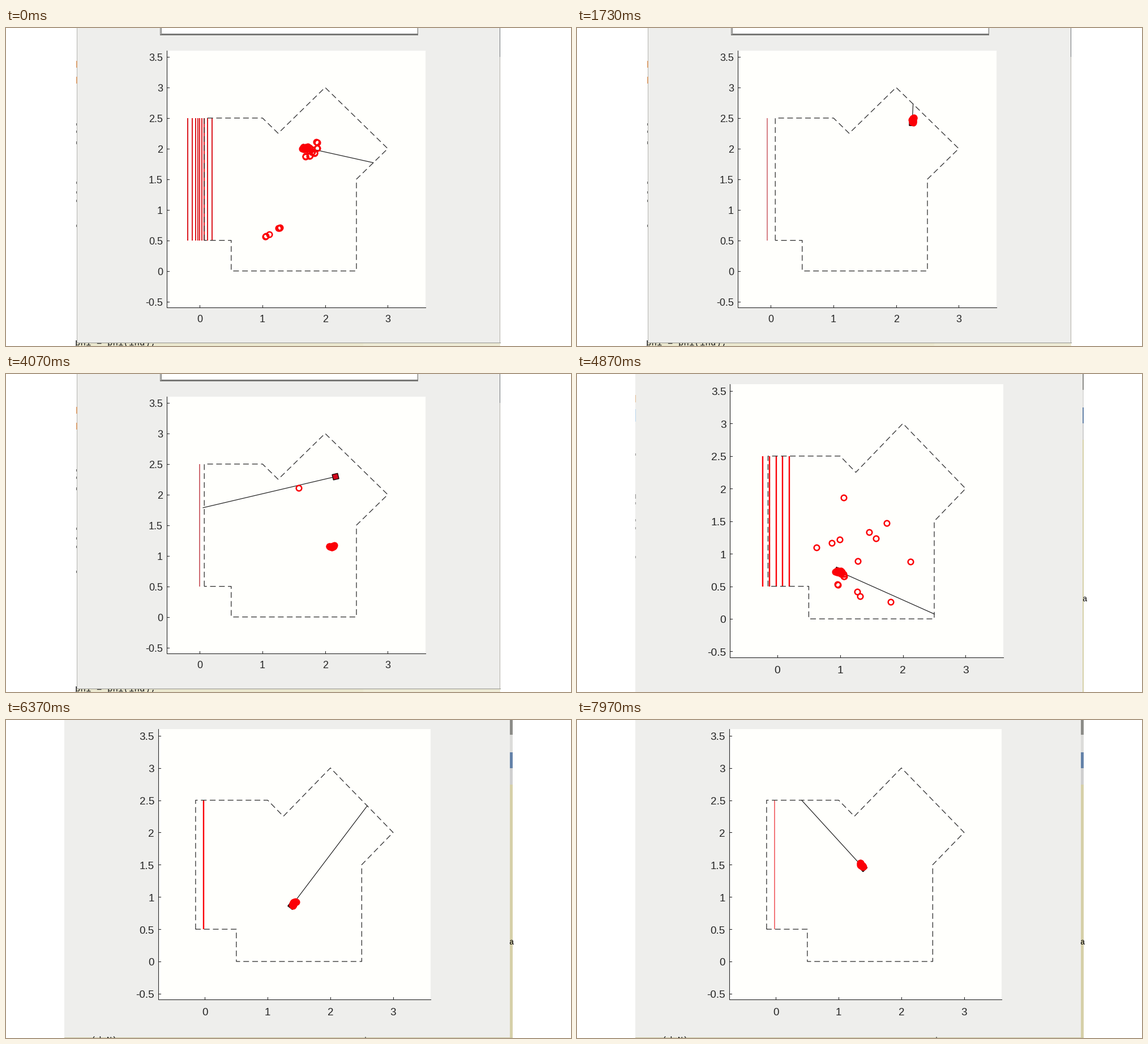
These frames come from a looping animation (998x561 px, 8000 ms). A matplotlib script:

```python
import numpy as np
import matplotlib.pyplot as plt
from matplotlib.animation import FuncAnimation
from matplotlib.patches import Polygon, Rectangle

W, H, DPI = 998, 561, 64
PT = 72 / DPI                      # points per pixel
STEP, FRAMES = 50, 160
FLIP, NEW_RUN, REFRAME = 3.6, 4.8, 5.6   # seconds: lost track, new run, new crop
INK, RED, PANEL, PAPER = "#262626", "#fb0007", "#eeeeec", "#fffffc"
SANS, MONO = "Liberation Sans", "Liberation Mono"

plt.rcParams["lines.scale_dashes"] = False
rng = np.random.default_rng(8)
fig = plt.figure(figsize=(W / DPI, H / DPI), dpi=DPI, facecolor="white")
ax = fig.add_axes([0, 0, 1, 1])
ax.set_xlim(0, W)
ax.set_ylim(H, 0)
ax.axis("off")


def room(wall):
    return np.array([(wall, .5), (wall, 2.5), (1, 2.5), (1.25, 2.25), (2, 3), (3, 2),
                     (2.5, 1.5), (2.5, 0), (.5, 0), (.5, .5), (wall, .5)])


class View:
    """One framing of the plot window: scale, origin and its static artists."""

    def __init__(self, origin, scale, wall, box, size):
        self.origin, self.scale = np.array(origin), np.array(scale) * (1, -1)
        self.wall, self.box, self.size = wall, box, size
        self.art = []

    def px(self, pts):
        return self.origin + self.scale * np.asarray(pts)

    def rect(self, x0, y0, x1, y1, color, z=1):
        self.art.append(ax.add_patch(Rectangle((x0, y0), x1 - x0, y1 - y0,
                                               fc=color, lw=0, zorder=z)))

    def line(self, xs, ys, color=INK, w=1.1, z=3, **kw):
        self.art += ax.plot(xs, ys, color=color, lw=w * PT, zorder=z, **kw)

    def text(self, x, y, s, size, font=SANS, color=INK, z=3, clip=None, **kw):
        item = ax.text(x, y, s, fontsize=size * PT, family=font, color=color,
                       va="baseline", zorder=z, **kw)
        if clip:
            x0, y0, x1, y1 = clip
            item.set_clip_path(Rectangle((x0, y0), x1 - x0, y1 - y0,
                                         transform=ax.transData))
        self.art.append(item)

    def specks(self, x, color):
        for y in rng.integers(130, 350, 8):
            self.rect(x, y, x + 1, y + 4, color, 3)

    def axes(self):
        l, t, r, b = self.box
        self.rect(l, t, r, b, PAPER, 2)
        self.line([l, l, r], [t, b, b], solid_joinstyle="miter")
        for v in np.arange(-.5, 3.6, .5):
            y = self.px((0, v))[1]
            self.line([l, l + 4], [y, y])
            self.text(l - 7, y + 7.4, f"{v:g}", self.size, ha="right")
        for v in range(4):
            x = self.px((v, 0))[0]
            self.line([x, x], [b, b - 4])
            self.text(x, b + 1.48 * self.size, str(v), self.size, ha="center")
        self.line(*self.px(room(self.wall)).T, color="#303030", w=1.3, z=6,
                  dashes=(10 * PT, 5.8 * PT), dash_capstyle="butt")

    def show(self, on):
        for a in self.art:
            a.set_visible(on)


wide = View((342.5, 428.6), (110.6, 107.9), .07, (284, 40, 741, 492.5), 18)
wide.rect(125, 0, 873, 555, PANEL)
wide.rect(125, 555, 873, H, "#ebe8cf", 0)
wide.rect(631, 556, 873, H, "#eeebd6", .2)
wide.line([125.5, 125.5], [0, 555], "#b4b4b0", 1)
wide.line([872.5, 872.5], [0, 555], "#b2b0a8", 1)
wide.line([872.5, 872.5], [0, 50], "#707478", 1)
wide.line([125, 873], [555, 555], "#a0a09a", 1.2)
for inset, color in enumerate(("#7c7c7a", "#dcdcda", "white")):
    wide.rect(272 + inset, 0, 728.5 - inset, 12.5 - 1.5 * inset, color, 1 + inset / 10)
wide.line([274.5, 274.5, 726], [0, 9.5, 9.5], "#6c6c6a", 1)
for y in (58, 86):
    wide.rect(124, y, 126, y + 12, "#d9a070", 4)
wide.specks(124, "#606060")
wide.text(122, 560, "phi = phi(ind);", 15.7, MONO, "#202020", .5, (124, 555, 264, H))

near = View((354, 432), (110.8, 114.9), -.15, (270.5, 18, 753.5, 500), 19.2)
near.rect(103, 37, 104.5, 50, "#e0b890", 3)
near.rect(103, 62, 104.5, 84, "#b8d4ec", 3)
near.specks(103, "#8a8a88")

late = View((351.5, 426), (110.75, 113.8), -.15, (269, 16, 750.5, 492.7), 18.9)
late.rect(103, 559.8, 895, H, "#c9c5a0", 1.5)
late.text(150, 570, "(d N)", 15.5, MONO, "#202020", clip=(148, 557, 198, H))
late.rect(634, 559, 636, H, "#777770", 2)

# slice of the window behind, at the right edge
for view, x, shift in ((near, 893.5, 2), (late, 890, 0)):
    view.rect(103, 0, 895, H, PANEL)
    for y, color in ((0, "#8c8c88"), (26, "#dcdcda"), (57, "#6482a8"),
                     (85, "#cfcfcf"), (114, "#d6d0a8")):
        view.rect(x, y + shift if y else 0, 895, H, color, 1.1 + y / 1000)
    view.text(x - 1.5, 396 + 2.5 * shift, "a", 14, MONO, "black", clip=(x - 1, 380, 895, 410))

views = (wide, near, late)
for v in views:
    v.axes()

# time, x, y, heading, drive from that key on (+1 forward, -1 reverse)
RUNS = (
    ((0, 1.67, 2.02, -14, 1), (1.73, 2.257, 2.424, 88, 1), (2.15, 2.26, 2.6, 109, -1),
     (3.17, 2.582, 2.294, 160.7, 1), (4.07, 2.166, 2.294, 193.5, 1),
     (4.85, 1.88, 2.12, 226, 1)),
    ((4.8, .945, .745, -27, 1), (5.47, 1.146, .722, 8.4, 1), (6.37, 1.385, .868, 52.1, 1),
     (7.97, 1.39, 1.455, 133.2, 1)),
)


def pose(t):
    """Position and heading on a Hermite path tangent to the headings."""
    keys = RUNS[t >= NEW_RUN]
    k = max(i for i in range(len(keys) - 1) if i == 0 or keys[i][0] <= t)
    (t0, x0, y0, h0, drive), (t1, x1, y1, h1, _) = keys[k:k + 2]
    u = min(max((t - t0) / (t1 - t0), 0), 1)
    a0, a1 = np.radians((h0, h1))
    p0, p1 = np.array((x0, y0)), np.array((x1, y1))
    d = drive * np.hypot(*(p1 - p0))
    pos = (p0 + (p1 - p0) * u * u * (3 - 2 * u)
           + d * u * (1 - u) ** 2 * np.array((np.cos(a0), np.sin(a0)))
           + d * u * u * (u - 1) * np.array((np.cos(a1), np.sin(a1))))
    return pos, a0 + (a1 - a0) * u


def beam(pos, a, wall):
    """Where a ray from pos first meets the room outline."""
    p = room(wall)
    q, e = p[:-1] - pos, np.diff(p, axis=0)
    c, s = np.cos(a), np.sin(a)
    det = c * e[:, 1] - s * e[:, 0]
    det[abs(det) < 1e-9] = 1e-9
    r = (q[:, 0] * e[:, 1] - q[:, 1] * e[:, 0]) / det
    w = (q[:, 0] * s - q[:, 1] * c) / det
    hit = r[(r > .01) & (abs(w - .5) <= .5 + 1e-6)]
    return pos + (hit.min() if len(hit) else 0) * np.array((c, s))


# particles sit just ahead of the robot, loosely at the start of a run
CLOUD = rng.uniform((-.045, -.025), (.045, .025), (16, 2))
GHOST = np.array((-.06, -1.15))    # wrong guess while the track is lost


def cloud(t, pos, turn):
    age = t - NEW_RUN if t >= NEW_RUN else t
    lost = FLIP <= t < NEW_RUN
    spread = 1 + 1.2 * np.exp(-age / .4)
    return pos + GHOST * lost + (CLOUD * spread + (.05 * (not lost), 0)) @ turn


# stray particles: start, end, pixel offset from the robot
strays = [(FLIP + .2, 4.2, (-65, 20)), (NEW_RUN, 5.8, (0, 25)), (NEW_RUN, 5.7, (-1, 24))]
for k in range(5):                 # arc of pairs beside the robot
    a, r = np.radians(28 * k - 25), 23 - 1.7 * k
    for _ in range(2):
        off = r * np.array((np.cos(a), np.sin(a))) + rng.uniform(-1, 1, 2)
        strays.append((0, rng.uniform(.45, .85), off))
for u in (0, .03, .25, .9, .95, 1):      # a far, thin trail
    strays.append((0, rng.uniform(.25, .5), (26 * u - 70, 157 - 16 * u)))
for _ in range(12):
    strays.append((NEW_RUN, NEW_RUN + rng.uniform(.1, .55),
                   rng.uniform((-40, -150), (130, 60))))

# wall guesses: start, end, x, width, colour; the outer ones die first
walls = [(0, .85 - .5 * abs(u), .19 * (.6 * u + .4 * u ** 3), 2, "#dc1a20")
         for u in np.linspace(-1, 1, 9)]
walls += [(.3, FLIP, -.063, 1.7, "#cf6c72"), (FLIP, NEW_RUN, 0, 2, "#cf6c72")]
walls += [(NEW_RUN, 6.9 if k == 0 else 6.3 - .5 * abs(k), .107 * k - .022, 2.4, RED)
          for k in range(-2, 3)]
walls += [(6.9, 9, -.022, 1.8, "#f2686c")]

guesses = [ax.plot([], [], color=c, lw=w * PT, zorder=5, solid_capstyle="butt")[0]
           for _, _, _, w, c in walls]
ray, = ax.plot([], [], color="#1c1c1c", lw=1.2 * PT, zorder=7)
body = ax.add_patch(Polygon(np.zeros((4, 2)), fc="#d2081c", ec="#180404",
                            lw=1.4 * PT, zorder=8))
dots, = ax.plot([], [], "o", ms=9.6 * PT, mew=2.5 * PT, mfc="none", mec=RED, zorder=9)
SQUARE = np.array([(-1, -1), (1, -1), (1, 1), (-1, 1)]) * .045


def draw(i):
    t = (i * STEP + 20) / 1000
    view = wide if t < NEW_RUN else near if t < REFRAME else late
    for v in views:
        v.show(v is view)

    for item, (t0, t1, x, _, _) in zip(guesses, walls):
        item.set_data(*view.px([(x, .5), (x, 2.5)]).T)
        item.set_visible(t0 <= t < t1)

    pos, a = pose(t)
    c, s = np.cos(a), np.sin(a)
    turn = np.array([(c, s), (-s, c)])
    wall = view.wall - .02 * (view is wide)
    ray.set_data(*view.px([pos, beam(pos, a, wall)]).T)
    body.set_xy(view.px(pos + SQUARE @ turn))

    extra = [view.px(pos) + off for t0, t1, off in strays if t0 <= t < t1]
    dots.set_data(*np.vstack([view.px(cloud(t, pos, turn))] + extra).T)
    return []


anim = FuncAnimation(fig, draw, frames=FRAMES, interval=STEP, init_func=lambda: draw(0),
                     repeat=True, repeat_delay=0, blit=False)
plt.show()
```
